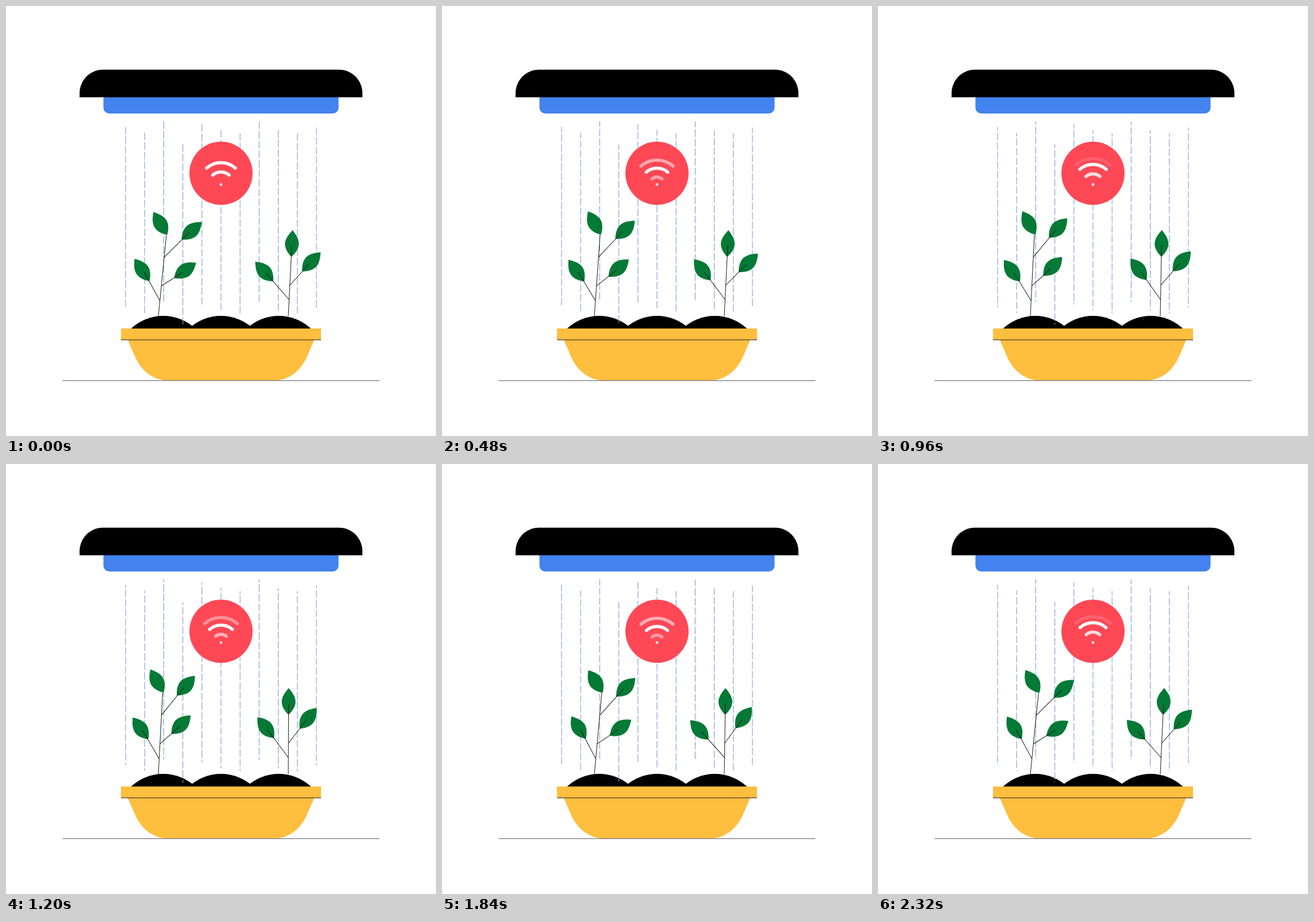
An HTML page with a canvas for the animation above (2.4 s loop, 748 px wide and 748 px high).

```html
<!DOCTYPE html>
<html lang="en">
<head>
<meta charset="utf-8">
<title>Smart planter</title>
<style>
  html, body { margin: 0; width: 100%; height: 100%; overflow: hidden; background: #fff; }
  canvas { display: block; }
</style>
</head>
<body>
<canvas id="stage" width="748" height="748"></canvas>
<script>
const LOOP = 2400, STEP = 80, RAD = Math.PI / 180;
const STEM = '#1a1a1a';
const ctx = document.getElementById('stage').getContext('2d');
const LEAF = new Path2D('M0 .5C-8-7-12-15-12-22C-12-31-6-39 0-46C6-39 12-31 12-22C12-15 8-7 0 .5Z');
const LAMP = new Path2D('M128 158.7V152C128 129 146 110.7 169 110.7H579C602 110.7 620 129 620 152V158.7Z');
const POT = new Path2D('M211.5 580L224 609C236 637 258 652 286 652H462C490 652 512 637 524 609L536.5 580Z');

let time = 0;

// Swinging angle in radians: mean and reach in degrees, moment of the maximum in ms
const sway = (mean, reach, peak) =>
  (mean + reach * Math.cos(2 * Math.PI * (time - peak) / LOOP)) * RAD;

function fill(color, path) {
  ctx.fillStyle = color;
  ctx.fill(path);
}

function line(x0, y0, x1, y1, color, width = 1) {
  ctx.strokeStyle = color;
  ctx.lineWidth = width;
  ctx.beginPath();
  ctx.moveTo(x0, y0);
  ctx.lineTo(x1, y1);
  ctx.stroke();
}

function disc(x, y, r, color) {
  ctx.fillStyle = color;
  ctx.beginPath();
  ctx.arc(x, y, r, 0, 2 * Math.PI);
  ctx.fill();
}

function lamp() {
  ctx.fillStyle = '#4383ee';
  ctx.beginPath();
  ctx.roundRect(169.5, 150, 409, 37, [0, 0, 10, 10]);
  ctx.fill();
  fill('#000', LAMP);
}

function pot() {
  ctx.fillStyle = '#000';
  for (const x of [273.5, 374, 474.5]) {
    ctx.beginPath();
    ctx.arc(x, 621, 82, 227 * RAD, 313 * RAD);
    ctx.fill();
  }
  fill('#febe3e', POT);
  ctx.fillRect(200, 561, 348, 20);
  line(200, 580.8, 548, 580.8, '#222');
  line(98.5, 651.7, 649.5, 651.7, '#777', 1.2);
}

function rays() {
  const dash = 13, gap = 3.7;
  ctx.setLineDash([dash, gap]);
  ctx.lineDashOffset = -(dash + gap) * 9 * time / LOOP;
  [...'24081340342'].forEach((drop, i) => {
    const x = 208 + 33.2 * i, y = 200.2 + 5 * drop + 0.13 * i;
    line(x, y, x, y + 313.5, '#86a5d9', 1.2);
  });
  ctx.setLineDash([]);
}

// A leaf on a twig that leaves the stem at the given height; bend sets it slightly off axis
function twig(height, angle, length = 0, bend = 0) {
  ctx.save();
  ctx.translate(0, -height);
  ctx.rotate(angle);
  ctx.save();
  ctx.translate(bend, -length);
  ctx.rotate(-bend / 45);
  fill('#057936', LEAF);
  ctx.restore();
  if (length) line(0, 0, bend, -length - 18, STEM);
  ctx.restore();
}

// Twig angles are absolute, so the lean of the stem is taken off
function plant(x, height, lean, twigs) {
  ctx.save();
  ctx.translate(x, 539.7);
  ctx.rotate(lean);
  for (const [at, angle, ...shape] of twigs) twig(at, angle - lean, ...shape);
  line(0, 0, 0, -height, STEM);
  ctx.restore();
}

function plants() {
  plant(265, 142, sway(4.35, 1.5, -200), [
    [142, sway(-28.7, 2, 760), 0, 1.5],
    [103, sway(43.6, 3.2, 40), 43.8, -1.7],
    [53, sway(51.7, 5.2, -200), 26.8, 1],
    [27, sway(-31.8, 2, -440), 39.3, 2.3]
  ]);
  const lean = sway(1.6, 1.55, 220);
  plant(491, 123, lean, [
    [104, lean],
    [54, sway(40.7, 4.8, 420), 32.6, -0.6],
    [29, sway(-39.5, 3.5, 860), 42.5, 0.6]
  ]);
}

function signal() {
  disc(374, 291, 55, '#ff4856');
  disc(374, 310.5, 2.3, '#fff');
  ctx.lineCap = 'round';
  ctx.lineWidth = 5.5;
  ctx.strokeStyle = '#fff';
  // Three waves, one period apart, swell and fade
  for (let k = 0; k < 3; k++) {
    const age = (7 * time / LOOP) % 1 + k, u = age / 3;
    const radius = 9.5 + 35.5 * u * (0.5 + 2.15 * u - 1.65 * u * u);
    ctx.globalAlpha = age && Math.min(1, 0.15 + 0.85 * age, (3 - age) ** 1.3);
    ctx.beginPath();
    ctx.arc(374, 310.5, radius, -131 * RAD, -49 * RAD);
    ctx.stroke();
  }
  ctx.globalAlpha = 1;
  ctx.lineCap = 'butt';
}

function draw() {
  time = Math.floor(performance.now() % LOOP / STEP) * STEP;
  ctx.clearRect(0, 0, 748, 748);
  lamp();
  pot();
  rays();
  plants();
  signal();
  requestAnimationFrame(draw);
}
draw();
</script>
</body>
</html>
```
